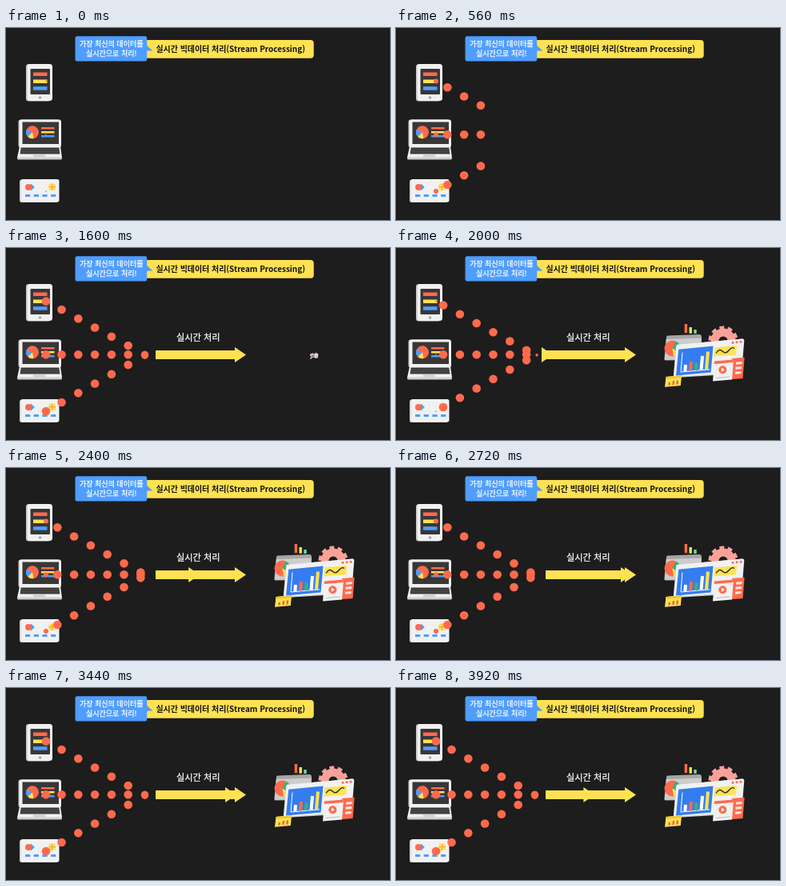
These frames come from a looping animation (480x240 px, 4000 ms). An HTML page:

```html
<!DOCTYPE html>
<html lang="ko">
<head>
<meta charset="utf-8">
<title>Stream Processing</title>
<style>
  html, body { margin: 0; width: 100%; height: 100%; overflow: hidden; background: #1d1d1d; }
  svg { display: block; width: 480px; height: 240px; }
  text { font-family: "Noto Sans CJK KR", "Noto Sans CJK", "Noto Sans", sans-serif; text-anchor: middle; }
  .medium { fill: #fff; stroke: #fff; stroke-width: .25px; }
  .red { fill: #ff6a4d; }
  .yellow { fill: #ffe252; }
  .blue { fill: #4f9dff; }
  .green { fill: #2fb67c; }
  .light { fill: #f1f1f1; }
  .shade { fill: #cfcfcf; }
  .dark { fill: #393636; }
</style>
</head>
<body>
<svg viewBox="0 0 480 240">
  <g id="title">
    <rect class="yellow" x="170" y="15" width="214.7" height="22.7" rx="4"/>
    <path class="blue" d="M175 21L183.5 28.5H175Z"/>
    <rect class="blue" x="86.5" y="10.3" width="89.7" height="31.2" rx="2.5"/>
    <g class="medium" font-size="9">
      <text x="131.7" y="23">가장 최신의 데이터를</text>
      <text x="131.7" y="34.8">실시간으로 처리!</text>
    </g>
    <text x="280.7" y="30" font-size="9.95" font-weight="700" fill="#111">실시간 빅데이터 처리(Stream Processing)</text>
  </g>

  <g id="tablet">
    <rect class="shade" x="25" y="45" width="31" height="46.5" rx="3.5"/>
    <rect class="light" x="27" y="45" width="31" height="46" rx="3.5"/>
    <rect class="dark" x="30.5" y="51" width="24.5" height="32" rx="1"/>
    <rect class="red" x="34" y="55.5" width="17.5" height="4.5"/>
    <rect class="yellow" x="34" y="64.5" width="17.5" height="4.5"/>
    <rect class="blue" x="34" y="73.2" width="17.5" height="4.5"/>
    <circle cx="42.5" cy="87" r="1.7" fill="#a5a5a5"/>
  </g>

  <g id="laptop">
    <rect class="shade" x="15.5" y="114.5" width="52" height="35" rx="3"/>
    <rect class="light" x="17" y="114.5" width="52" height="35" rx="3"/>
    <rect class="dark" x="20.5" y="117.5" width="45.5" height="27.5"/>
    <circle class="red" cx="33" cy="130.3" r="8"/>
    <path class="blue" d="M33 130.3L25.8 126.8A8 8 0 0 0 27.4 136Z"/>
    <path class="yellow" d="M33 130.3L27.4 136A8 8 0 0 0 34.5 138.1Z"/>
    <rect class="red" x="44" y="124" width="16.5" height="2.5"/>
    <rect class="yellow" x="44" y="129" width="16.5" height="2.5"/>
    <rect class="blue" x="44" y="134" width="16.5" height="2.5"/>
    <path class="light" d="M17 148H68L70 162H14Z"/>
    <path class="shade" d="M14 161.5H70V163Q70 164.5 68 164.5H16Q14 164.5 14 163Z"/>
    <path class="dark" d="M18.8 149.5H66.2L67.5 157.5H17.5Z"/>
    <path d="M18.6 152.2H66.4M18.2 154.9H66.9" stroke="#777" stroke-width=".5"/>
    <rect class="shade" x="34" y="158.3" width="15" height="2.8"/>
  </g>

  <g id="card">
    <rect class="shade" x="17" y="189.5" width="48" height="28.5" rx="2.5"/>
    <rect class="light" x="18.5" y="189" width="48" height="28.5" rx="2.5"/>
    <path class="blue" d="M31.5 194.7L35.8 199L31.5 203.3L27.2 199Z"/>
    <circle class="red" cx="28" cy="199" r="4"/>
    <rect class="yellow" x="53.5" y="194.5" width="8.5" height="8.5" rx="2"/>
    <path d="M57.75 194.5V203M53.5 198.75H62" stroke="#f39a3c"/>
    <path d="M24 209.5H62.5" stroke="#4f9dff" stroke-width="3" stroke-dasharray="6.2 4.5"/>
  </g>

  <g id="arrow" class="yellow">
    <path id="shaft"/>
    <path id="pulse" d="M0 124L14 133.5L0 143Z"/>
  </g>
  <text id="label" class="medium" x="240.3" y="116.3" font-size="11.2">실시간 처리</text>

  <g id="board">
    <rect class="red" x="360.7" y="95" width="3.4" height="11.2"/>
    <rect class="yellow" x="366.5" y="99" width="3.4" height="7.7"/>
    <rect x="372.3" y="102" width="3.4" height="5" fill="#6fdca6"/>
    <g fill="none" stroke="#f9a198">
      <circle cx="409" cy="116" r="10.5" stroke-width="10"/>
      <circle cx="409" cy="116" r="16.5" stroke-width="4" stroke-dasharray="5.9 4.47"/>
    </g>
    <path fill="#a6a6a6" d="M338 111Q338 109.5 340 109.4L379 108Q382 108 382 111L380 140L337 140.5Q335 140.5 335.3 138.5Z"/>
    <path fill="#cdcdcd" d="M337.8 114L382 112.5L380 139L336 140Z"/>
    <circle class="red" cx="345.5" cy="125.5" r="10"/>
    <path class="green" d="M345.5 125.5L350 116.6A10 10 0 0 1 354.2 130.5Z"/>
    <path class="yellow" d="M345.5 125.5L354.2 130.5A10 10 0 0 1 347 135.4Z"/>

    <path class="shade" d="M350 123Q350 121 352 120.8L433 113.5Q435.5 113.3 435.3 116L432 157L349 162Q346.5 162 346.8 159.5Z"/>
    <path class="light" d="M350.5 123Q350.6 121 352.5 120.8L433 113.5Q435 113.3 434.8 116L431.5 155L349 161Q347.2 161 347.4 159Z"/>
    <g class="red">
      <circle cx="421" cy="118.3" r="1.5"/><circle cx="426" cy="117.8" r="1.5"/><circle cx="431" cy="117.3" r="1.5"/>
    </g>
    <path fill="#347df0" d="M353.2 126.8L396.5 122.6L393.5 155.5L350 159.5Z"/>
    <path d="M358 130.5L356 155L392 151.8" fill="none" stroke="#fff"/>
    <g stroke-width="4">
      <path d="M361.3 154L362 146" stroke="#fff"/>
      <path d="M368 153.5L369 142" stroke="#ff6a4d"/>
      <path d="M374.8 153L375.7 143.5" stroke="#2fb67c"/>
      <path d="M381.5 152.5L383 135" stroke="#fff"/>
      <path d="M388 152L390 129.5" stroke="#ffe252"/>
    </g>
    <path class="yellow" d="M398.5 124.3L426 122L425 133.2L397.6 135.5Z"/>
    <path d="M400 131.5Q404 125 408 129T416 128T423 125.5" fill="none" stroke="#222" stroke-width="1.3"/>
    <path class="red" d="M420 138L435.6 136.7L433.5 163L418 164.3Z"/>
    <path d="M425 144.3L432.5 143.6M424.5 150.3L432 149.6M424 156.3L431.5 155.6" stroke="#ffe6df" stroke-width="3"/>
    <path class="light" d="M398 141.5L422 139.5L420 164.5L396 166.5Z"/>
    <path class="red" d="M398 141.5L422 139.5L421.7 143L397.7 145Z"/>
    <circle class="red" cx="408.3" cy="152.2" r="5"/>
    <path fill="#fff" d="M406.8 149.5L411 152L406.8 154.7Z"/>
    <path d="M400 162.5L417 161" stroke="#bbb" stroke-width="1.2"/>
    <path class="yellow" d="M337.5 161L357 159L355.8 172L336 173.8Z"/>
    <path fill="#efc53c" d="M337.5 161L357 159L356.7 162L337.2 164Z"/>
    <path d="M341.5 171.5L341.8 168M346.5 171L347 166M351.5 170.5L351.9 165.5" stroke="#e8663f" stroke-width="2.4"/>
  </g>

  <g id="dots" class="red"></g>
</svg>
<script>
const LOOP = 4000, STEP = 80, FILM = 24 / 1000;
const PULSE = 18;              // film ticks between arrow pulses
const lanes = [[65.8, 133.3], [133.3, 133.3], [204.8, 134.3]];

const $ = id => document.getElementById(id);
const clamp = (x, lo = 0, hi = 1) => Math.min(hi, Math.max(lo, x));
const smooth = x => { x = clamp(x); return x * x * (3 - 2 * x); };

const dots = [];
for (const [y0, y1] of lanes) {
  for (let k = -1; k < 7; k++) {
    const el = document.createElementNS("http://www.w3.org/2000/svg", "circle");
    $("dots").append(el);
    dots.push({ el, k, y0, y1 });
  }
}

// Dots pop up at the device and shrink away at the arrow.
function dotRadius(s) {
  if (s < 0) return 5.2 * clamp(1 + s / 0.6);
  return 5.3 * clamp((6.7 - s) / 0.8);
}

function drawDots(tick) {
  const flow = (tick - 2) / 4, born = Math.floor(flow);
  for (const { el, k, y0, y1 } of dots) {
    const s = flow - born + k, p = clamp(s / 6, 0.01);
    el.setAttribute("cx", clamp(48.7 + 20.8 * s, 50, 176));
    el.setAttribute("cy", y0 + (y1 - y0) * p);
    el.setAttribute("r", born >= k ? dotRadius(s) : 0);
  }
}

function drawArrow(tick) {
  const grow = smooth((tick - 27) / 9);
  const tip = 187 + 113 * grow, neck = Math.max(187, tip - 14);
  $("shaft").setAttribute("d", `M187 128H${neck}V124L${tip} 133.5L${neck} 143V139H187Z`);
  $("arrow").style.opacity = grow > 0 ? 1 : 0;
  $("label").style.opacity = grow;

  const age = tick - 48;
  const run = (Math.max(age, 0) % PULSE / PULSE) ** 1.2;
  $("pulse").style.opacity = age < 0 ? 0 : 1;
  $("pulse").setAttribute("transform", `translate(${182 + 106 * run} 0)`);
}

function drawBoard(tick) {
  const bump = Math.sin(Math.PI * clamp((tick - 41) / 5));
  const size = smooth((tick - 37) / 5) + 0.02 * bump;
  $("board").setAttribute("transform", `translate(385 134.5) scale(${size}) translate(-385 -134.5)`);
  $("board").style.opacity = size > 0 ? 1 : 0;
}

function draw(ms) {
  const shown = Math.floor((ms % LOOP + 0.5) / STEP) % (LOOP / STEP) * STEP;
  const tick = Math.floor(shown * FILM + 1e-6);
  drawDots(tick);
  drawArrow(tick);
  drawBoard(tick);
}

const start = performance.now();
function loop() {
  draw(performance.now() - start);
  requestAnimationFrame(loop);
}
loop();
</script>
</body>
</html>
```
